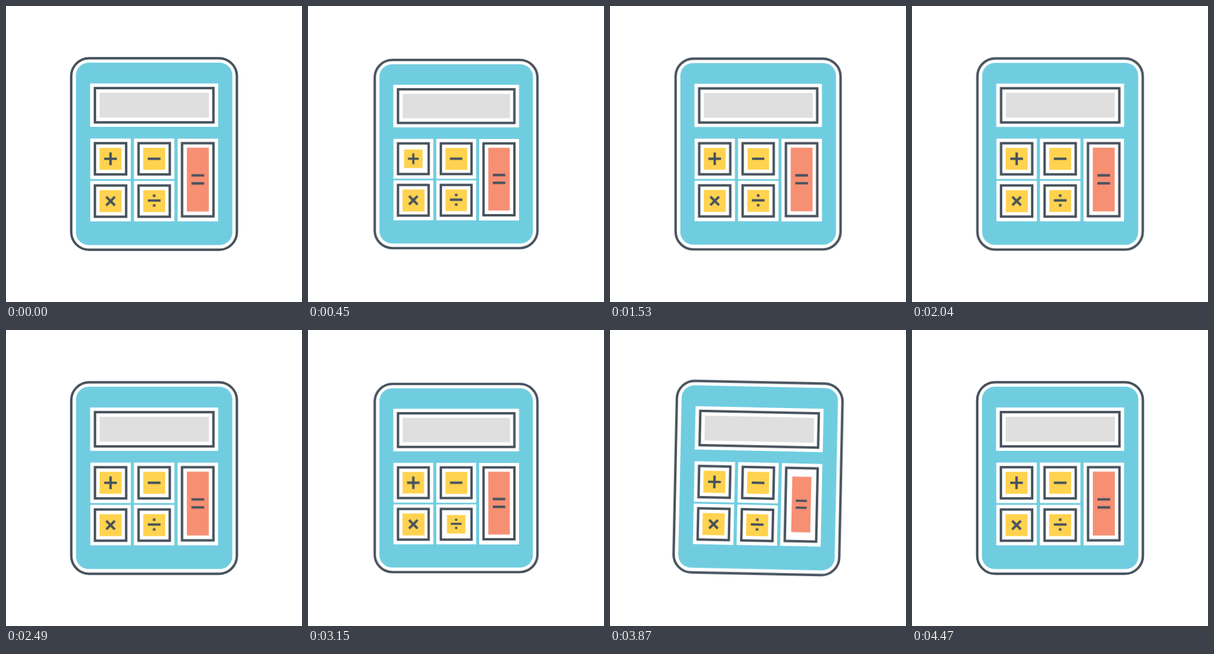
Write an HTML page that moves like this. It is 512 by 512 pixels and loops after 4.5 s.

```html
<!DOCTYPE html>
<html lang="en">
<head>
<meta charset="utf-8">
<title>Calculator</title>
<style>
  html, body { margin: 0; width: 100%; height: 100%; overflow: hidden; background: #fff; }
  svg { display: block; width: 100vw; height: 100vh; }

  .line { fill: #fff; stroke: #46525d; stroke-width: 4.2; }
  .sign { fill: none; stroke: #46525d; stroke-width: 4.2; }
  .white { fill: #fff; }
  .blue { fill: #70cde0; }
  .gray { fill: #dfdfdf; }
  .yellow { fill: #ffd34f; }
  .coral { fill: #f78f73; }

  /* One loop is five turns of 900 ms, one for each key. */
  .pulse, .sway, .cap {
    animation: 4500ms cubic-bezier(.37, 0, .63, 1) infinite;
  }
  .pulse, .sway { transform-box: view-box; transform-origin: 256px 256px; }
  .cap { transform-box: fill-box; transform-origin: center; }

  .pulse { animation-name: pulse; }
  .sway { animation-name: sway; }
  .cap { animation-name: tap; }
  .minus { animation-delay: 900ms; }
  .times { animation-delay: 1800ms; }
  .divide { animation-delay: 2700ms; }
  .equals { animation-name: hold; }

  @keyframes pulse {
    0%, 4%, 16%, 24%, 36%, 44%, 56%, 64%, 76%, 100% { transform: scale(1); }
    10%, 30%, 50%, 70% { transform: scale(.982); }
  }
  @keyframes tap {
    0%, 4%, 16%, 100% { transform: scale(1); }
    10% { transform: scale(.86); }
  }
  @keyframes hold {
    0%, 82%, 98%, 100% { transform: scale(1); }
    86%, 94% { transform: scale(.87); }
  }
  @keyframes sway {
    0%, 80%, 97.5%, 100% { transform: rotate(0deg); }
    82.5%, 92.5% { transform: rotate(-2deg); }
    87.5% { transform: rotate(2deg); }
  }
</style>
</head>
<body>
<svg viewBox="0 0 512 512">
  <defs>
    <g id="frame">
      <rect class="white" x="-35" y="-35" width="70" height="70"/>
      <rect class="line" x="-27" y="-27" width="54" height="54"/>
    </g>
  </defs>
  <g class="sway"><g class="pulse">
    <rect class="line" x="112.8" y="90.3" width="286.6" height="331.4" rx="31"/>
    <rect class="blue" x="121" y="98" width="270.5" height="315.5" rx="22"/>

    <rect class="white" x="145.5" y="134" width="221.5" height="75"/>
    <rect class="line" x="153.8" y="142" width="205" height="59.3"/>
    <rect class="gray" x="162" y="150" width="189" height="43"/>

    <g transform="translate(180.8 264.3)">
      <use href="#frame"/>
      <g class="cap">
        <rect class="yellow" x="-19" y="-19" width="38" height="38"/>
        <path class="sign" d="M-11 0H11M0 -11V11"/>
      </g>
    </g>
    <g transform="translate(256.3 264.3)">
      <use href="#frame"/>
      <g class="cap minus">
        <rect class="yellow" x="-19" y="-19" width="38" height="38"/>
        <path class="sign" d="M-11 0H11"/>
      </g>
    </g>
    <g transform="translate(180.8 337.5)">
      <use href="#frame"/>
      <g class="cap times">
        <rect class="yellow" x="-19" y="-19" width="38" height="38"/>
        <path class="sign" d="M-7.5 -7.5L7.5 7.5M7.5 -7.5L-7.5 7.5"/>
      </g>
    </g>
    <g transform="translate(256.3 337.5)">
      <use href="#frame"/>
      <g class="cap divide">
        <rect class="yellow" x="-19" y="-19" width="38" height="38"/>
        <path class="sign" d="M-11 -1H11M-2.3 -9.3H2.3M-2.3 7.5H2.3"/>
      </g>
    </g>
    <g transform="translate(331.8 300.5)">
      <rect class="white" x="-35" y="-71" width="70" height="143"/>
      <rect class="line" x="-27.3" y="-63.2" width="54.4" height="126.6"/>
      <g class="cap equals">
        <rect class="coral" x="-19" y="-55.5" width="38" height="110.5"/>
        <path class="sign" d="M-11 -7.5H11M-11 6.3H11"/>
      </g>
    </g>
  </g></g>
</svg>
</body>
</html>
```
